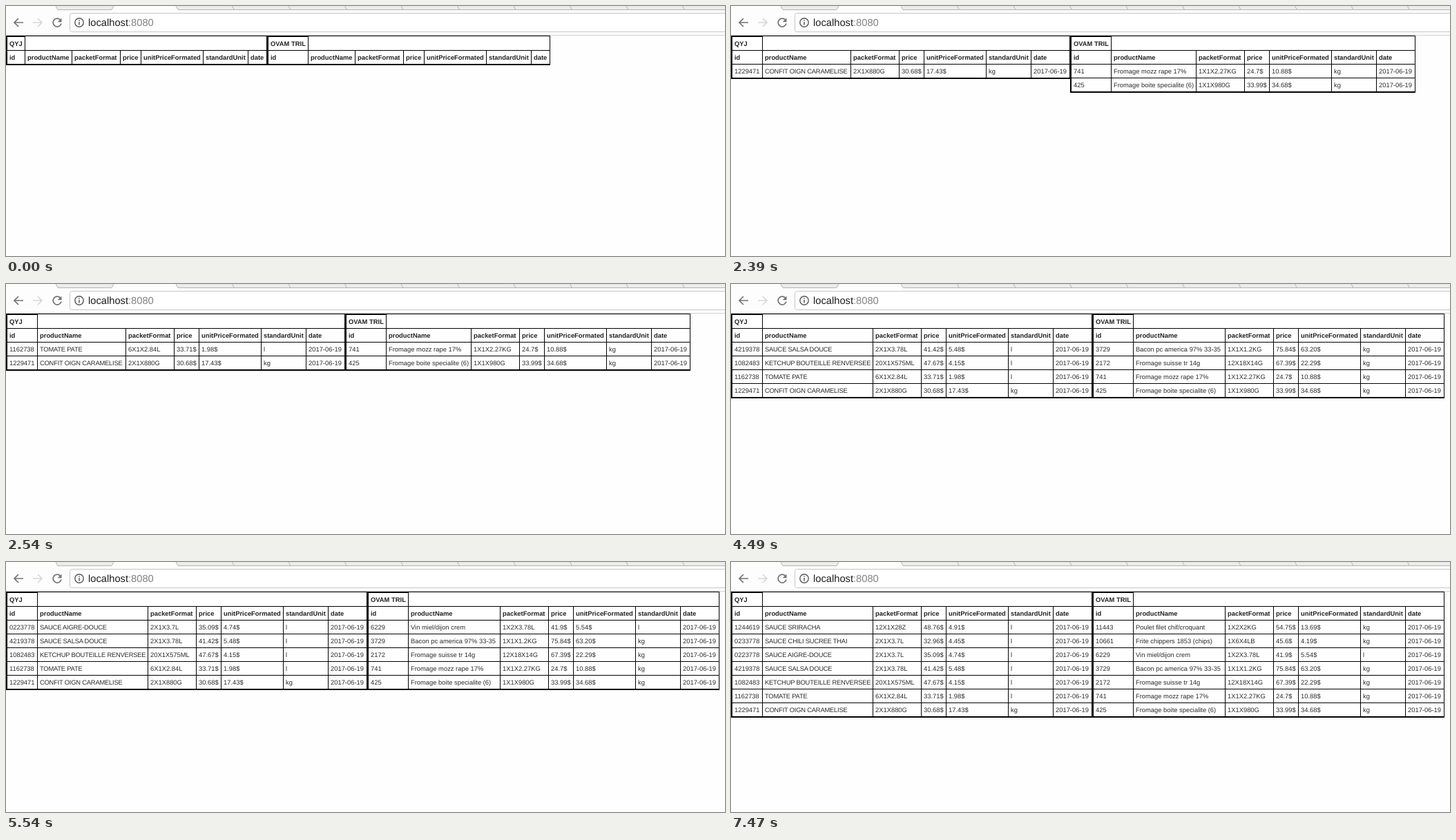
An HTML page for the animation above (7.62 s loop, 1041x363 px).

```html
<!DOCTYPE html>
<html lang="en">
<head>
<meta charset="utf-8">
<title>Price tables</title>
<style>
  html, body { margin: 0; width: 100%; height: 100%; overflow: hidden; background: #fefefe; }
  svg { display: block; width: 1041px; height: 363px; }
  text { font-family: "Liberation Sans", Arial, sans-serif; text-rendering: geometricPrecision; white-space: pre; }
  .cell { font-size: 9.4px; fill: #2b2b2b; }
  .head { font-weight: bold; fill: #222; }
  .caps { letter-spacing: -.22px; }
  .url { font-size: 14.7px; fill: #1c1c1c; }
  .port { fill: #808080; }
  rect { shape-rendering: crispEdges; }
  .icon { fill: none; stroke: #727272; stroke-width: 1.7; }
</style>
</head>
<body>
<svg id="stage" viewBox="0 0 1041 363">
  <rect width="1041" height="42" fill="#fdfdfd"/>
  <g id="tabs" stroke="#b4b4b4" fill="none"></g>
  <rect y="42" width="1041" height="1" fill="#d2d2d2"/>
  <rect x="92.5" y="10.5" width="980" height="27" rx="3" fill="#fff" stroke="#c6c6c6" style="shape-rendering:auto"/>
  <path class="icon" d="M25 24H12.5M18 18L12 24L18 30"/>
  <path class="icon" style="stroke:#d6d6d6" d="M39 24H51.500M46 18L52 24L46 30"/>
  <path class="icon" d="M78.600 20A6 6 0 1 0 80 25.500"/>
  <path d="M80.500 17.500V23.300H74.700Z" fill="#727272"/>
  <circle cx="106" cy="24" r="6.200" class="icon" style="stroke:#555;stroke-width:1.400"/>
  <path d="M106 23V27.500M106 20.300V21.800" stroke="#555" stroke-width="1.500"/>
  <text class="url" x="119" y="29">localhost<tspan class="port">:8080</tspan></text>
  <g id="tables"></g>
  <path id="pointer" d="M1021.500 354.500V371L1033.500 370Z" fill="#111" stroke="#fff" visibility="hidden"/>
</svg>
<script>
const LOOP = 7620, TOP = 43, ROW = 20;
const DATE = '2017-06-19';
const FIELDS = ['id', 'productName', 'packetFormat', 'price', 'unitPriceFormated', 'standardUnit', 'date'];

// Oldest first; each new row is shown on top.
const parse = list => list.trim().split('\n').map(line => [...line.trim().split('|'), DATE]);
const LEFT = {
  title: 'QYJ',
  rows: parse(`
    1229471|CONFIT OIGN CARAMELISE|2X1X880G|30.68$|17.43$|kg
    1162738|TOMATE PATE|6X1X2.84L|33.71$|1.98$|l
    1082483|KETCHUP BOUTEILLE RENVERSEE|20X1X575ML|47.67$|4.15$|l
    4219378|SAUCE SALSA DOUCE|2X1X3.78L|41.42$|5.48$|l
    0223778|SAUCE AIGRE-DOUCE|2X1X3.7L|35.09$|4.74$|l
    0233778|SAUCE CHILI SUCREE THAI|2X1X3.7L|32.96$|4.45$|l
    1244619|SAUCE SRIRACHA|12X1X28Z|48.76$|4.91$|l`)
};
const RIGHT = {
  title: 'OVAM TRIL',
  rows: parse(`
    425|Fromage boite specialite (6)|1X1X980G|33.99$|34.68$|kg
    741|Fromage mozz rape 17%|1X1X2.27KG|24.7$|10.88$|kg
    2172|Fromage suisse tr 14g|12X18X14G|67.39$|22.29$|kg
    3729|Bacon pc america 97% 33-35|1X1X1.2KG|75.84$|63.20$|kg
    6229|Vin miel/dijon crem|1X2X3.78L|41.9$|5.54$|l
    10661|Frite chippers 1853 (chips)|1X6X4LB|45.6$|4.19$|kg
    11443|Poulet filet chif/croquant|1X2X2KG|54.75$|13.69$|kg`)
};

// start time, rows left, rows right
const STEPS = [
  [0, 0, 0], [1500, 1, 1], [2390, 1, 2], [2540, 2, 2], [3440, 3, 3],
  [4490, 4, 4], [5540, 5, 5], [6430, 6, 6], [7470, 7, 7]
];
const POINTER = [5830, 5980];

const widths = (id, name, filled) => [id, name, 70, filled ? 36 : 30, 90, 65, filled ? 56 : 27];
const leftWidths = n => widths(n ? 45 : 27, !n ? 68 : n < 3 ? 128 : 160, n);
const rightWidths = n => widths(59, !n ? 68 : n < 4 ? 123 : 133, n);

const rect = (x, y, w, h, fill = '#000') =>
  `<rect x="${x}" y="${y}" width="${w}" height="${h}" fill="${fill}"/>`;
const label = (x, y, str, cls = '') => `<text class="cell ${cls}" x="${x}" y="${y}">${str}</text>`;

function table(data, count, cols, x0) {
  const width = cols.reduce((a, b) => a + b) + 1;
  const bottom = TOP + 41 + count * ROW;
  let out = rect(x0, TOP, width, bottom - TOP, '#fff');
  out += rect(x0, TOP, 2, bottom + 2 - TOP) + rect(x0, bottom, width, 2);
  out += rect(x0, TOP, width, 1) + rect(x0, TOP, cols[0] + 1, 2);
  for (let y = TOP + 21; y < bottom; y += ROW) out += rect(x0, y, width, 1);

  const lines = [FIELDS, ...data.rows.slice(0, count).reverse()];
  out += label(x0 + 5, TOP + 15, data.title, 'head');
  let x = x0;
  cols.forEach((w, c) => {
    const textX = x + (c ? 4 : 5);
    lines.forEach((line, r) => {
      const caps = c === 1 && line[c] === line[c].toUpperCase();
      out += label(textX, TOP + 35 + r * ROW, line[c], r ? (caps ? 'caps' : '') : 'head');
    });
    x += w;
    const y = c === 0 || c === cols.length - 1 ? TOP : TOP + 21;
    out += rect(x, y, 1, bottom + 2 - y);
  });
  return { out, width };
}

function scene([, nLeft, nRight]) {
  const a = table(LEFT, nLeft, leftWidths(nLeft), 0);
  const b = table(RIGHT, nRight, rightWidths(nRight), a.width);
  return a.out + b.out;
}

function drawTabs() {
  let out = '<path d="M72 0L75 5.500H153L156 0Z" fill="#ececec" stroke="none"/>' +
    '<path d="M246 0L249 5.500H1041V0Z" fill="#ececec" stroke="none"/>' +
    '<path d="M72 0L75 5.500H153L156 0M246 0L249 5.500H1041"/>';
  for (let i = 1; i < 10; i++) {
    const x = 246 + i * 81.5;
    out += `<path d="M${x} 0L${x + 3} 5.500"/>`;
  }
  document.getElementById('tabs').innerHTML = out;
}

const tables = document.getElementById('tables');
const pointer = document.getElementById('pointer');
const scenes = STEPS.map(scene);
let shown = -1;

function draw() {
  const t = performance.now() % LOOP;
  const step = STEPS.filter(s => s[0] <= t).length - 1;
  if (step !== shown) tables.innerHTML = scenes[shown = step];
  const over = t >= POINTER[0] && t < POINTER[1];
  pointer.setAttribute('visibility', over ? 'visible' : 'hidden');
  requestAnimationFrame(draw);
}

drawTabs();
draw();
</script>
</body>
</html>
```
